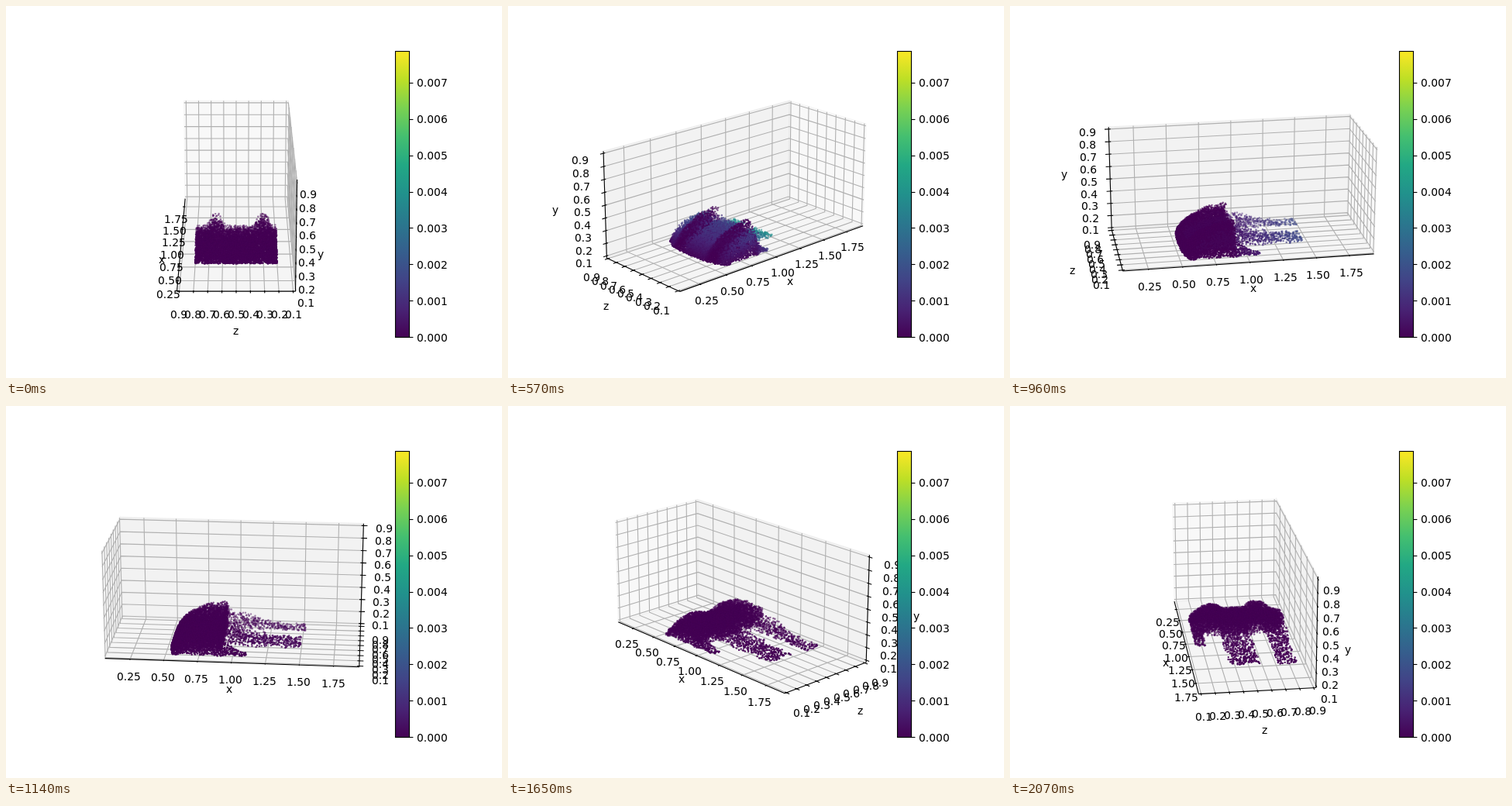
These frames come from a looping animation (640 by 480 pixels, 2100 ms). An HTML page with a canvas:

```html
<!DOCTYPE html>
<html lang="en">
<head>
<meta charset="utf-8">
<title>Particle flow</title>
<style>
  html, body { margin: 0; width: 100%; height: 100%; overflow: hidden; background: #fff; }
  canvas { display: block; }
</style>
</head>
<body>
<canvas id="stage" width="640" height="480"></canvas>
<script>
const ctx = document.getElementById('stage').getContext('2d');
const STEP = 30, COUNT = 70, TURN = 2.5;
const LINE = 1.11;
const FONT = '13.89px "DejaVu Sans", Verdana, sans-serif';

// Axis order: 0 = x, 1 = z (depth), 2 = y (up)
const CENTER = [1, 0.5, 0.5];
const DELTA = [0.15, 0.8 / 12, 0.8 / 12];
const LOW = CENTER.map((c, i) => c - 6.25 * DELTA[i]);
const HIGH = CENTER.map((c, i) => c + 6.25 * DELTA[i]);
const UNIT = 0.86064, DIST = 10, ZOOM = 1997.8, CX = 297, CY = 237.4;
const ELEV = 20 * Math.PI / 180, SE = Math.sin(ELEV), CE = Math.cos(ELEV);
const TICK_PAD = 1.037, NAME_PAD = 2.255;

const tenths = Array.from({ length: 9 }, (_, i) => (i + 1) / 10);
const quarters = Array.from({ length: 7 }, (_, i) => (i + 1) / 4);
const AXES = [
  { name: 'x', ticks: quarters, digits: 2, shift: 1, tickDir: 1, pane: '242,242,242' },
  { name: 'z', ticks: tenths, digits: 1, shift: 0, tickDir: 0, pane: '230,230,230' },
  { name: 'y', ticks: tenths, digits: 1, shift: 0, tickDir: 0, pane: '236,236,236' }
];

const VIRIDIS = ['440154', '482475', '414487', '355f8d', '2a788e', '21918c',
  '22a884', '44bf70', '7ad151', 'bddf26', 'fde725'];
const VMAX = 0.00788;
const mix = (a, b, f) => a + (b - a) * f;
const clamp = (v, a, b) => Math.min(b, Math.max(a, v));
const rgb = hex => [0, 2, 4].map(i => parseInt(hex.substr(i, 2), 16));
const SHADES = Array.from({ length: 101 }, (_, i) => {
  const n = Math.min(9, Math.floor(i / 10)), f = i / 10 - n;
  const a = rgb(VIRIDIS[n]), b = rgb(VIRIDIS[n + 1]);
  return `rgb(${a.map((v, k) => Math.round(mix(v, b[k], f)))})`;
});
const shade = v => SHADES[Math.round(clamp(v / VMAX, 0, 1) * 100)];

// Flow state over the steps of the loop, joined linearly
const KEYS = [0, 11, 20, 27, 38, 69];
const FLOW = {
  reach:  [0, 0.16, 0.65, 0.91, 1, 1],
  spread: [0, 0.15, 0.5, 0.75, 0.85, 1],
  base:   [0.255, 0.285, 0.285, 0.28, 0.285, 0.29],
  corner: [0, 0.07, 0.07, 0.06, 0.03, 0.03],
  ridge:  [0.054, 0.056, 0.058, 0.06, 0.068, 0.075],
  heat:   [0, 1, 0.4, 0.06, 0, 0],
  jet:    [0, 0.8, 0.9, 0.7, 0.02, 0]
};
function flowAt(n) {
  let i = 0;
  while (i < KEYS.length - 2 && n > KEYS[i + 1]) i++;
  const f = (n - KEYS[i]) / (KEYS[i + 1] - KEYS[i]);
  const out = {};
  for (const k in FLOW) out[k] = mix(FLOW[k][i], FLOW[k][i + 1], f);
  return out;
}

let seed = 7;
function rand() {
  seed = (seed + 0x6D2B79F5) | 0;
  let t = Math.imul(seed ^ (seed >>> 15), 1 | seed);
  t = (t + Math.imul(t ^ (t >>> 7), 61 | t)) ^ t;
  return ((t ^ (t >>> 14)) >>> 0) / 4294967296;
}

const body = Array.from({ length: 8500 }, () => ({ a: rand(), z: 0.2 + 0.6 * rand(), v: rand() }));
const jets = [];
[[0.7, 0.8, 0.63, 480], [0.36, 0.58, 0.61, 680], [0.2, 0.25, 0.22, 180]].forEach(([z0, z1, len, n]) => {
  for (let i = 0; i < n; i++) {
    const s = Math.pow(rand(), 1.6);
    jets.push({ s, len, z: mix(z0, z1, rand()), v: rand() });
  }
});

const edge = z => Math.pow(Math.abs(z - 0.5) / 0.3, 4);
const widen = (z, f) => z + Math.sign(z - 0.5) * edge(z) * 0.05 * f.spread;
const ridge = (z, w) => Math.max(...[0.3, 0.65].map(c => Math.exp(-Math.pow((z - c) / w, 4))));

function particles(n) {
  const f = flowAt(n), out = [];
  for (const p of body) {
    const r = ridge(p.z, f.ridge), e = edge(p.z);
    const x0 = 0.525 + f.corner * e;
    const crest = mix(f.base, 0.345, r) - 0.04 * e * f.spread;
    const dome = Math.pow(1 - (1 - p.a) * (1 - p.a), 0.6);
    const y = 0.1 + p.v * (crest - 0.1) * dome;
    const rise = clamp((y - 0.1) / 0.19, 0, 1);
    const side = p.z > 0.7 ? 0.0048 : 0.0034;
    out.push([mix(x0, 0.915, p.a), widen(p.z, f), y,
      f.heat * side * (1 - 0.95 * r) * (0.08 + 0.92 * Math.pow(rise, 1.2))]);
  }
  for (const p of jets) {
    const x = 0.885 + p.s * p.len * f.reach;
    const y = 0.1 + p.v * (0.015 + 0.14 * Math.pow(1 - p.s, 2));
    out.push([x, widen(p.z, f), y, f.jet * 0.0045 * (0.2 + 0.8 * p.s) * Math.min(1, p.len / 0.6)]);
  }
  return out;
}

let cosA, sinA;
function project(p) {
  const X = (p[0] - 1) * UNIT, Y = (p[1] - 0.5) * UNIT, Z = (p[2] - 0.5) * UNIT;
  const near = X * cosA + Y * sinA;
  const depth = DIST - near * CE - Z * SE;
  return [CX + ZOOM * (Y * cosA - X * sinA) / depth, CY - ZOOM * (Z * CE - near * SE) / depth, depth];
}

function path(points, close) {
  ctx.beginPath();
  points.forEach(p => {
    const q = project(p);
    ctx.lineTo(q[0], q[1]);
  });
  if (close) ctx.closePath();
}
function line(points, color) {
  path(points);
  ctx.strokeStyle = color;
  ctx.lineWidth = LINE;
  ctx.stroke();
}
const put = (p, i, v) => {
  const q = p.slice();
  q[i] = v;
  return q;
};
const outward = (p, skip, pad) => p.map((v, i) =>
  i === skip ? v : v + (v < CENTER[i] ? -1 : 1) * pad * DELTA[i]);

function text(str, x, y) {
  ctx.fillStyle = '#000';
  ctx.fillText(str, Math.round(x), Math.round(y));
}
function centered(str, x, y) {
  text(str, x - ctx.measureText(str).width / 2, y);
}

function drawBox() {
  const far = [cosA > 0 ? LOW[0] : HIGH[0], sinA > 0 ? LOW[1] : HIGH[1], LOW[2]];
  const close = far.map((v, i) => v === LOW[i] ? HIGH[i] : LOW[i]);

  AXES.forEach((ax, i) => {
    const j = (i + 1) % 3, k = (i + 2) % 3;
    const a = put(far, j, close[j]);
    path([far, a, put(a, k, close[k]), put(far, k, close[k])], true);
    ctx.fillStyle = ctx.strokeStyle = `rgba(${ax.pane},0.5)`;
    ctx.lineWidth = 1.39;
    ctx.fill();
    ctx.stroke();
  });

  AXES.forEach((ax, i) => {
    const j = (i + 1) % 3, k = (i + 2) % 3;
    ax.ticks.forEach(t => {
      const p = put(far, i, t);
      line([put(p, j, close[j]), p, put(p, k, close[k])], '#b0b0b0');
    });
  });

  AXES.forEach((ax, i) => {
    const start = put(far, ax.shift, close[ax.shift]);
    line([put(start, i, LOW[i]), put(start, i, HIGH[i])], '#000');
    const d = ax.tickDir, sign = start[d] < CENTER[d] ? 1 : -1;
    ax.ticks.forEach(t => {
      const p = put(start, i, t);
      line([put(p, d, p[d] + sign * 0.1 * DELTA[d]), put(p, d, p[d] - sign * 0.2 * DELTA[d])], '#000');
      const q = project(outward(p, i, TICK_PAD));
      centered(t.toFixed(ax.digits), q[0], q[1] + 11);
    });
    const q = project(outward(put(start, i, CENTER[i]), i, NAME_PAD));
    centered(ax.name, q[0], q[1] + 4);
  });
}

function drawParticles(n) {
  const dots = particles(n).map(p => [...project(p), p[3]]);
  dots.sort((a, b) => b[2] - a[2]);
  const back = dots[0][2], span = back - dots[dots.length - 1][2];
  for (const [x, y, depth, v] of dots) {
    ctx.globalAlpha = 1 - 0.6 * (1 - (back - depth) / span);
    ctx.fillStyle = shade(v);
    ctx.beginPath();
    ctx.arc(x, y, 1.2, 0, 7);
    ctx.fill();
  }
  ctx.globalAlpha = 1;
}

const ramp = ctx.createLinearGradient(0, 427.2, 0, 57.6);
VIRIDIS.forEach((c, i) => ramp.addColorStop(i / 10, '#' + c));

function drawScale() {
  ctx.fillStyle = ramp;
  ctx.fillRect(502, 58, 18.5, 369.5);
  ctx.strokeStyle = '#000';
  ctx.lineWidth = LINE;
  ctx.strokeRect(502.5, 58.5, 18, 369);
  for (let i = 0; i < 8; i++) {
    const y = 427.2 - i * 0.001 / VMAX * 369.6, row = Math.floor(y + 0.5) + 0.5;
    ctx.beginPath();
    ctx.moveTo(520.5, row);
    ctx.lineTo(525.4, row);
    ctx.stroke();
    text((i / 1000).toFixed(3), 530, y + 5.4);
  }
}

function draw(n) {
  const azim = (180 + n * TURN) * Math.PI / 180;
  cosA = Math.cos(azim);
  sinA = Math.sin(azim);
  ctx.fillStyle = '#fff';
  ctx.fillRect(0, 0, 640, 480);
  ctx.font = FONT;
  drawBox();
  drawParticles(n);
  drawScale();
}

const begin = performance.now();
let shown = -1;
function tick() {
  const n = Math.floor((performance.now() - begin) / STEP) % COUNT;
  if (n !== shown) draw(shown = n);
  requestAnimationFrame(tick);
}
tick();
</script>
</body>
</html>
```
